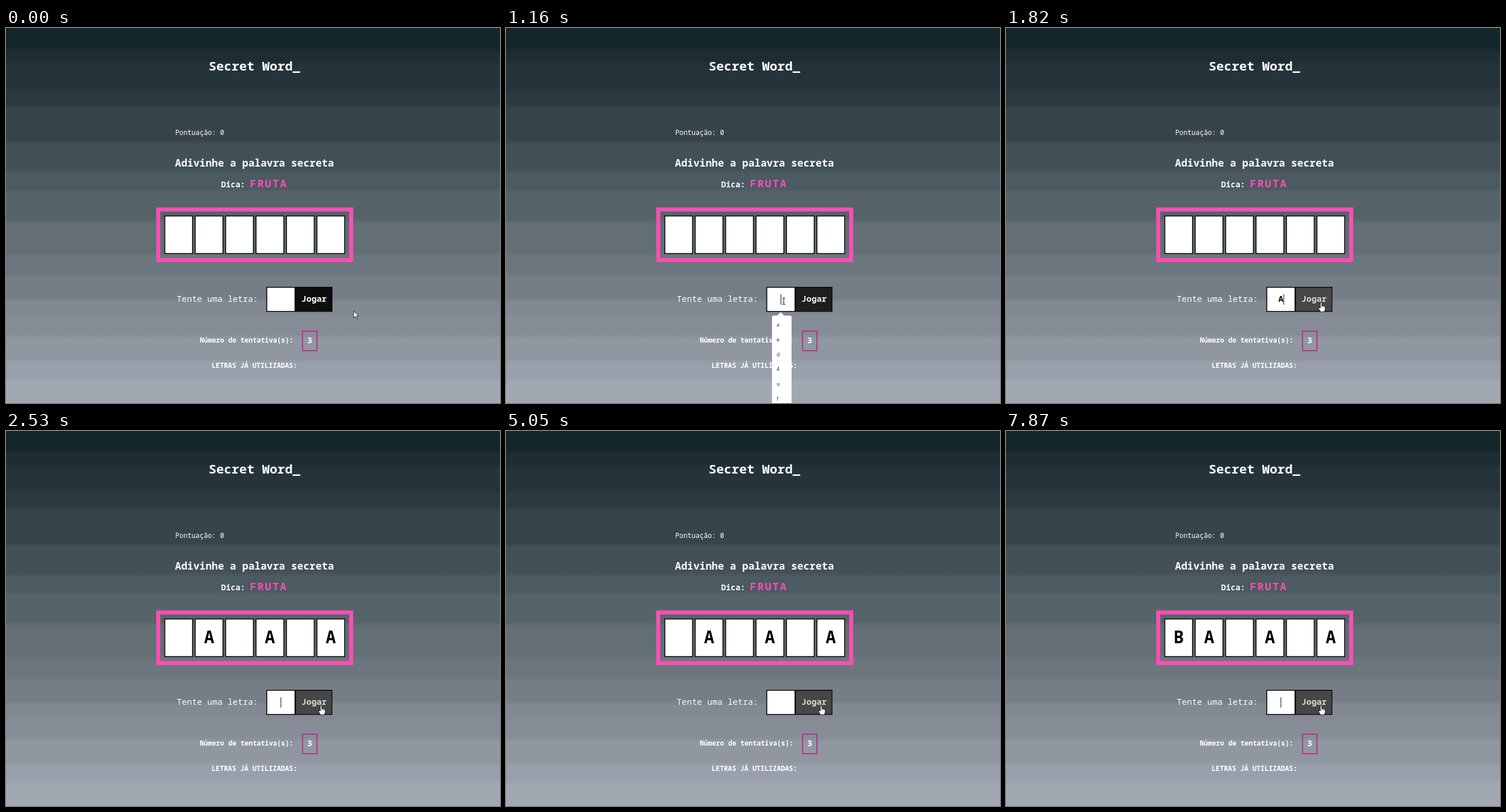
An HTML page that plays this animation: 858x652 px, repeating every 8 s.

```html
<!DOCTYPE html>
<html lang="pt">
<head>
<meta charset="utf-8">
<title>Secret Word</title>
<style>
  html, body { margin: 0; width: 100%; height: 100%; overflow: hidden; background: #15262a; }
  svg { display: block; width: 858px; height: 652px; }
  text { font-family: "Noto Sans Mono", "DejaVu Sans Mono", monospace; white-space: pre; }
  .b { font-weight: 700; }
  .mid { text-anchor: middle; }
  .menu text { font: 9px "Noto Sans", "Open Sans", sans-serif; fill: #333; }
</style>
</head>
<body>
<svg viewBox="0 0 858 652">
  <defs>
    <linearGradient id="sky" gradientUnits="userSpaceOnUse" x1="0" y1="0" x2="0" y2="652"></linearGradient>
  </defs>
  <rect width="858" height="652" fill="url(#sky)"/>

  <g fill="#fff">
    <text class="b" x="352" y="74" font-size="22.1">Secret Word_</text>
    <text x="294" y="186" font-size="11.79">Pontuação: 0</text>
    <text class="b" x="293.6" y="241" font-size="17.69">Adivinhe a palavra secreta</text>
    <text class="b" x="373.8" y="277" font-size="13.8">Dica:</text>
    <text class="b" x="423.5" y="277" font-size="18.4" letter-spacing="2.1" fill="#f94fb2">FRUTA</text>
    <text x="296.5" y="476" font-size="14.74">Tente uma letra:</text>
    <text class="b" x="336.5" y="547" font-size="11.79">Número de tentativa(s):</text>
    <text class="b mid" x="527.5" y="548.4" font-size="14.74">3</text>
    <text class="b" x="357.3" y="590.5" font-size="11.79">LETRAS JÁ UTILIZADAS:</text>
  </g>
  <rect x="515" y="527" width="25" height="34" fill="none" stroke="#b83388" stroke-width="2"/>

  <rect x="264.5" y="315.5" width="335" height="88" fill="none" stroke="#f94fb2" stroke-width="7"/>
  <g id="tiles"></g>

  <rect x="452" y="450" width="115" height="43.5" fill="#0d0d0d"/>
  <rect x="453.7" y="451.6" width="47.5" height="40.4" fill="#fff"/>
  <rect id="btn" x="503.7" y="451.6" width="62" height="40.4"/>
  <text id="play" class="b" x="513" y="476" font-size="14.74">Jogar</text>
  <text id="entry" class="b mid" x="477.5" y="476" font-size="14.74"></text>
  <rect id="caret" y="463" width="1" height="18" fill="#111"/>

  <g id="menu" class="menu">
    <path d="M471 500L477 494L483 500Z" fill="#fff"/>
    <rect x="462" y="500" width="34" height="170" rx="3" fill="#fff"/>
  </g>

  <g id="arrow">
    <path d="M0 0V12L2.8 9.5L4.7 13.7L6.5 12.9L4.7 8.8H8.4Z" fill="#fff" stroke="#111" stroke-width=".9"/>
  </g>
  <g id="hand">
    <path d="M-1.3 10V1Q0 -.9 1.3 1V6Q2.7 5.2 3.5 6.4Q5 5.6 5.6 7Q7.2 6.6 7.2 8.3V12.2L5.6 16.7H-.9L-4.3 11.2Q-4.7 9.4 -3 9.4Z"
      fill="#fff" stroke="#111" stroke-width=".9" stroke-linejoin="round"/>
    <path d="M1.3 6V9M3.5 6.6V9M5.5 7.2V9.2" stroke="#111" stroke-width=".7"/>
  </g>
  <g id="beam">
    <path d="M-2.5 -5.5H-.7L0 -5L.7 -5.5H2.5M0 -5V5M-2.5 5.5H-.7L0 5L.7 5.5H2.5" fill="none" stroke="#222" stroke-width="1.1"/>
  </g>
</svg>
<script>
const LOOP = 8000;
const $ = id => document.getElementById(id);

function add(parent, tag, attrs, text = '') {
  const el = document.createElementNS('http://www.w3.org/2000/svg', tag);
  for (const key in attrs) el.setAttribute(key, attrs[key]);
  el.textContent = text;
  return parent.appendChild(el);
}

// Background: soft-edged bands, each starting at y
const bands = [
  [0, '#15262a'], [38, '#1d2d32'], [62, '#24343a'], [107, '#2c3a3f'], [137, '#37454a'],
  [200, '#435157'], [250, '#4c5a61'], [284, '#56646a'], [337, '#636e75'], [394, '#6c767e'],
  [432, '#757d86'], [474, '#828993'], [500, '#868d97'], [537, '#9097a1'], [580, '#9aa0ab'],
  [612, '#a2a8b2']
];
bands.forEach(([y, color], i) => {
  const end = i + 1 < bands.length ? bands[i + 1][0] - 5 : 652;
  for (const at of [i ? y + 3 : 0, end]) add($('sky'), 'stop', { offset: at / 652, 'stop-color': color });
});

const letters = Array.from({ length: 6 }, (_, i) => {
  const x = 275 + i * 52.84;
  add($('tiles'), 'rect', {
    x: x + .8, y: 326.8, width: 48.2, height: 65.4, fill: '#fff', stroke: '#0a0a0a', 'stroke-width': 1.6
  });
  return add($('tiles'), 'text', { class: 'b mid', x: x + 24.9, y: 368.5, 'font-size': 29.5 });
});

[...'aed4uf'].forEach((c, i) => add($('menu'), 'text', { x: 470, y: 519 + i * 25.8 }, c));

// Each step lists only what changes at its time
const steps = [
  [0, { tool: 'arrow', x: 604, y: 492, hover: 0, caret: 0, entry: '', word: '      ', menu: 0 }],
  [140, { x: 632, y: 504 }],
  [260, { x: 668, y: 513 }],
  [380, { x: 648, y: 510 }],
  [500, { x: 590, y: 499 }],
  [620, { tool: 'hand', x: 538, y: 486, hover: .5 }],
  [740, { x: 504, y: 487.5, hover: 1 }],
  [890, { tool: 'beam', x: 492, y: 480, hover: .85 }],
  [1040, { x: 482.5, y: 475, hover: .6, caret: 477, menu: 1 }],
  [1160, { hover: .3 }],
  [1280, { tool: 'hand', x: 520, y: 478, hover: .5 }],
  [1400, { x: 542, y: 476, hover: 1 }],
  [1550, { x: 547.3, y: 476.7, entry: 'A', caret: 482 }],
  [1670, { menu: .5 }],
  [1820, { menu: 0 }],
  [2230, { caret: 0 }],
  [2380, { entry: '' }],
  [2530, { word: ' A A A', caret: 477 }],
  [2960, { caret: 0 }],
  [3540, { caret: 477 }],
  [4100, { caret: 0 }],
  [4510, { caret: 477 }],
  [5050, { caret: 0 }],
  [5640, { caret: 477 }],
  [5920, { entry: 'B', caret: 482 }],
  [6350, { caret: 0 }],
  [6640, { entry: '' }],
  [6760, { word: 'BA A A', caret: 477 }],
  [7310, { caret: 0 }],
  [7870, { caret: 477 }]
];

const gray = v => `rgb(${v},${v},${v})`;
let shown = -1;

function draw(t) {
  const count = steps.filter(s => s[0] <= t).length;
  if (count === shown) return;
  shown = count;
  const s = Object.assign({}, ...steps.slice(0, count).map(step => step[1]));
  for (const id of ['arrow', 'hand', 'beam']) {
    $(id).style.display = id === s.tool ? '' : 'none';
    $(id).setAttribute('transform', `translate(${s.x} ${s.y})`);
  }
  $('btn').setAttribute('fill', gray(13 + 58 * s.hover));
  $('play').setAttribute('fill', gray(255 - 39 * s.hover));
  $('entry').textContent = s.entry;
  $('caret').setAttribute('x', s.caret);
  $('caret').style.display = s.caret ? '' : 'none';
  $('menu').style.opacity = s.menu;
  letters.forEach((el, i) => el.textContent = s.word[i].trim());
}

const start = performance.now();
function tick() {
  draw((performance.now() - start) % LOOP);
  requestAnimationFrame(tick);
}
tick();
</script>
</body>
</html>
```
